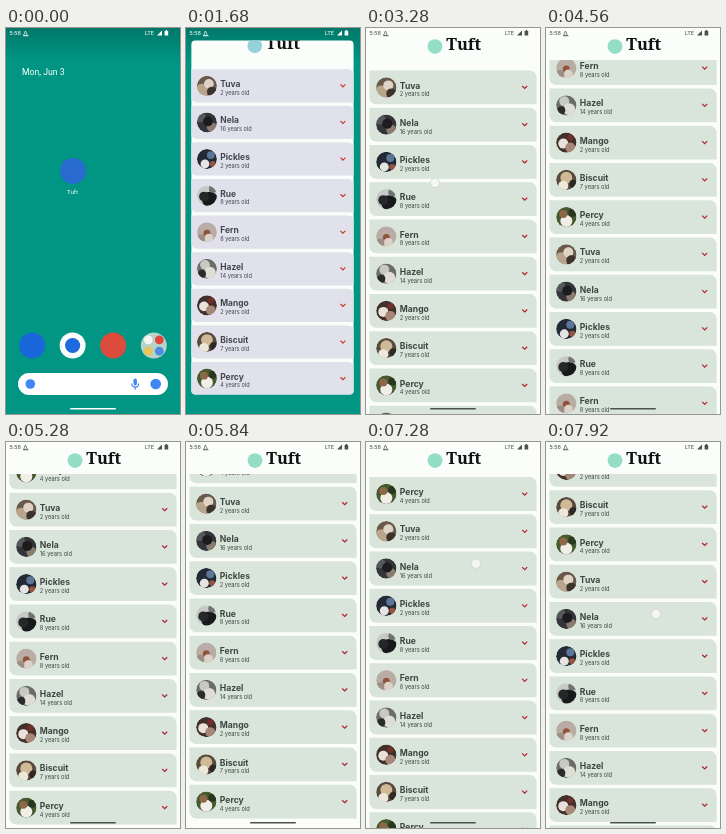
These frames come from a looping animation (174x386 px, 8000 ms). An HTML page:

```html
<!DOCTYPE html>
<html lang="en">
<head>
<meta charset="utf-8">
<style>
html, body { margin: 0; width: 100%; height: 100%; overflow: hidden; background: #009683; }
svg { display: block; width: 174px; height: 386px; }
text { font-family: Inter, sans-serif; }
.sys text, .home text { font-family: Roboto, sans-serif; }
.brand { font: 900 16.4px "Noto Serif", serif; fill: #101211; }
.card { fill: var(--card); }
.name { font-weight: 700; font-size: 8.6px; fill: var(--ink); }
.age { font-size: 5.7px; fill: var(--ink); }
.chev { fill: none; stroke: var(--accent); stroke-width: 1.2; }
.mark { fill: var(--mark); }
</style>
</head>
<body>
<svg id="stage" viewBox="0 0 174 386" xmlns="http://www.w3.org/2000/svg">
  <defs>
    <linearGradient id="sky" x1="0" y1="0" x2="0" y2="1">
      <stop offset="0" stop-color="#00786a"/>
      <stop offset=".03" stop-color="#008272"/>
      <stop offset=".09" stop-color="#009683"/>
    </linearGradient>
    <clipPath id="win"><rect id="winRect"/></clipPath>
    <clipPath id="body"><rect x="-10" y="32" width="194" height="420"/></clipPath>
    <clipPath id="round"><circle r="10.2"/></clipPath>
  </defs>

  <rect width="174" height="386" fill="url(#sky)"/>

  <g id="home" class="home">
    <text x="16" y="47.3" font-size="8.7" fill="#fff">Mon, Jun 3</text>
    <circle cx="67" cy="143" r="13" fill="#2a6bd0"/>
    <text x="66.5" y="166" font-size="6.2" fill="#fff" text-anchor="middle">Tuft</text>
    <circle cx="26.2" cy="317.5" r="13" fill="#1a67dc"/>
    <circle cx="66.6" cy="317.5" r="13" fill="#fcfcfc"/>
    <circle cx="66.6" cy="317.5" r="7.6" fill="#1c6ade"/>
    <circle cx="107.2" cy="317.5" r="13" fill="#dc4b3c"/>
    <circle cx="147.8" cy="317.5" r="13" fill="#b5d3c6"/>
    <circle cx="142.3" cy="311.8" r="4.4" fill="#f3f5f2"/>
    <circle cx="153.3" cy="311.8" r="4.4" fill="#e2453a"/>
    <circle cx="142.3" cy="323.2" r="4.4" fill="#eac55b"/>
    <circle cx="153.3" cy="323.2" r="4.4" fill="#4c8be8"/>
    <rect x="12" y="345" width="150" height="22" rx="11" fill="#fdfefd"/>
    <circle cx="24.3" cy="356" r="4.8" fill="#4285f4"/>
    <rect x="127.5" y="350.5" width="3.4" height="7" rx="1.7" fill="#4285f4"/>
    <path d="M125.8 355.5a3.4 3.6 0 0 0 6.8 0M129.2 359.2v2.6" fill="none" stroke="#4285f4" stroke-width="1.1"/>
    <circle cx="149.7" cy="356" r="5.3" fill="#4285f4"/>
  </g>

  <g clip-path="url(#win)">
    <g id="app">
      <rect x="-40" y="-20" width="254" height="480" fill="#fafdf9"/>
      <g id="content">
        <g clip-path="url(#body)"><g id="list"></g></g>
        <circle class="mark" cx="69" cy="18.6" r="7.4"/>
        <text class="brand" x="80.2" y="21.6">Tuft</text>
      </g>
    </g>
  </g>

  <g id="sys" class="sys">
    <text x="3.2" y="7.4" font-size="6">5:58</text>
    <path d="M17.6 7.4l1.8-4.4 2 4.4zM17 7.8h5.6" fill="none" stroke="currentColor" stroke-width=".7"/>
    <text x="138.8" y="7.4" font-size="6">LTE</text>
    <path d="M151 7.4h5v-5z"/>
    <path d="M158.6 2.9h1v-.8h1.6v.8h1v4.6h-3.6z"/>
  </g>
  <rect id="bar" x="64" y="380" width="46" height="1.4" rx=".7"/>
  <circle id="dot" r="4.7" fill="#f6f8f6" fill-opacity=".88" stroke="#bcc5bf" stroke-width=".5"/>
</svg>

<script>
const LOOP = 8000, PITCH = 37.25, TOP = 42.5;
const $ = id => document.getElementById(id);

// name, age, backdrop, then blobs as [x, y, r, colour]
const pets = [
  ['Tuva', 2, '#6a5a4c', [[-5, 5, 7, '#b9a48c'], [2, -2, 5, '#ded3c4'], [5, 6, 5, '#3c332c']]],
  ['Nela', 16, '#34353a', [[-6, -5, 5, '#55585c'], [5, 5, 5, '#8a7d70'], [1, -1, 5, '#1c1c1e']]],
  ['Pickles', 2, '#232a36', [[-2, 5, 4.5, '#e6e4e2'], [4, -4, 4, '#5c7698'], [6, 5, 3, '#98523e']]],
  ['Rue', 8, '#c6c9c6', [[3, 4, 8, '#17191a'], [-3, 1, 5, '#252829'], [6, -7, 4, '#6e7470']]],
  ['Fern', 8, '#b9aca5', [[0, 1, 3.5, '#8f5439'], [2, 6, 4.5, '#dcd2ca'], [-6, 6, 4, '#9d8d85']]],
  ['Hazel', 14, '#6b6d69', [[-2, -4, 5, '#c9c9c3'], [3, 4, 6, '#dfddd6'], [-5, 5, 4, '#2a2c2b']]],
  ['Mango', 2, '#42302a', [[-3, 1, 5, '#e9e2db'], [4, 5, 5, '#a78776'], [4, -5, 3, '#742f2b']]],
  ['Biscuit', 7, '#584b3e', [[0, -2, 6, '#d0b996'], [-3, 6, 5, '#eee7db'], [7, 4, 4, '#2e2925']]],
  ['Percy', 4, '#46592f', [[0, 4, 6, '#f0eee6'], [-3, -3, 4, '#8d6848'], [6, -4, 4, '#29371f']]]
];

function row([name, age, back, blobs], i) {
  const fur = blobs.map(([x, y, r, c]) => `<circle cx="${x}" cy="${y}" r="${r}" fill="${c}"/>`).join('');
  return `<g transform="translate(0 ${TOP + i * PITCH})">
    <path class="card" d="M3.4 0H163.8a6.8 6.8 0 0 1 6.8 6.8V33.8H10.2a6.8 6.8 0 0 1 -6.8 -6.8z"/>
    <g transform="translate(20.3 16.9)" clip-path="url(#round)"><circle r="10.2" fill="${back}"/>${fur}</g>
    <text class="name" x="33.8" y="18">${name}</text>
    <text class="age" x="33.8" y="25.9">${age} years old</text>
    <path class="chev" d="M156.2 15.5l2.5 2.5 2.5-2.5"/></g>`;
}
$('list').innerHTML = [...pets, ...pets].map(row).join('');

const clamp = x => Math.max(0, Math.min(1, x));
const ramp = (t, a, b) => clamp((t - a) / (b - a));
const lerp = (a, b, p) => a + (b - a) * p;
const mix = (a, b, p) => `rgb(${a.map((v, i) => Math.round(lerp(v, b[i], p)))})`;

// Monotone cubic through [time, value] points
function track(pts) {
  const slope = i => (pts[i + 1][1] - pts[i][1]) / (pts[i + 1][0] - pts[i][0]);
  const tan = pts.map((_, i) => {
    if (!i || i === pts.length - 1) return 0;
    const a = slope(i - 1), b = slope(i);
    return a * b > 0 ? 2 * a * b / (a + b) : 0;
  });
  return t => {
    if (t <= pts[0][0]) return pts[0][1];
    const i = pts.findIndex(p => p[0] > t) - 1;
    if (i < 0) return pts[pts.length - 1][1];
    const [t0, a] = pts[i], [t1, b] = pts[i + 1], h = t1 - t0, u = (t - t0) / h, v = 1 - u;
    return v * v * (1 + 2 * u) * a + u * u * (3 - 2 * u) * b + h * u * v * (v * tan[i] - u * tan[i + 1]);
  };
}
const scroll = track([[4000, 0], [4240, 55], [4560, 168], [4960, 277], [5400, 333], [7040, 333],
  [7320, 300], [7600, 262], [7760, 256.5], [7920, 255]]);
const stretch = track([[5400, 0], [5540, .012], [5760, 0], [5840, 0], [6640, .027], [6780, .027], [7040, 0]]);

function touch(t, s) {
  if (t >= 720 && t < 1320) return [68, 147];
  if (t >= 3280 && t < 4400) return [69, 155 - s];
  if (t >= 7080) return [110, 427 - s];
}

function set(el, attrs) {
  for (const k in attrs) el.setAttribute(k, attrs[k]);
}

function draw(t) {
  const open = t >= 1280;
  const p = open ? 1 - Math.pow(1 - ramp(t, 1240, 2000), 2.8) : 0;
  const full = t >= 1960;

  // Window grows out of the launcher icon
  const x = lerp(61, 0, p), y = lerp(143, 0, p);
  set($('winRect'), { x, y, width: lerp(101, 174, p) - x, height: lerp(163, 386, p) - y,
    rx: full ? 0 : lerp(13, 3, p) });
  $('app').style.display = open ? '' : 'none';
  const k = lerp(.8, 1, p);
  set($('content'), { opacity: ramp(p, .4, .8),
    transform: `translate(${lerp(81, 87, p)} ${lerp(-6, 0, p)}) scale(${k}) translate(-87 0)` });
  set($('home'), { opacity: 1 - ramp(t, 1260, 1480) });

  // Theme shifts from lavender to green
  const g = ramp(t, 2080, 2480), css = $('stage').style;
  css.setProperty('--card', mix([224, 225, 235], [217, 228, 218], g));
  css.setProperty('--ink', mix([68, 69, 78], [60, 70, 64], g));
  css.setProperty('--accent', mix([196, 60, 40], [176, 36, 48], g));
  css.setProperty('--mark', mix([148, 209, 218], [147, 222, 197], g));

  const s = scroll(t);
  set($('list'), { transform: `translate(0 386) scale(1 ${1 + stretch(t)}) translate(0 ${-386 - s})` });

  const tone = full ? '#4c534f' : '#fff';
  set($('sys'), { fill: tone, color: tone });
  set($('bar'), { fill: tone, opacity: open && !full ? 0 : 1 });

  const at = touch(t, s);
  $('dot').style.display = at ? '' : 'none';
  if (at) set($('dot'), { cx: at[0], cy: at[1] });
}

const start = performance.now();
function tick() {
  draw((performance.now() - start) % LOOP);
  requestAnimationFrame(tick);
}
tick();
</script>
</body>
</html>
```
